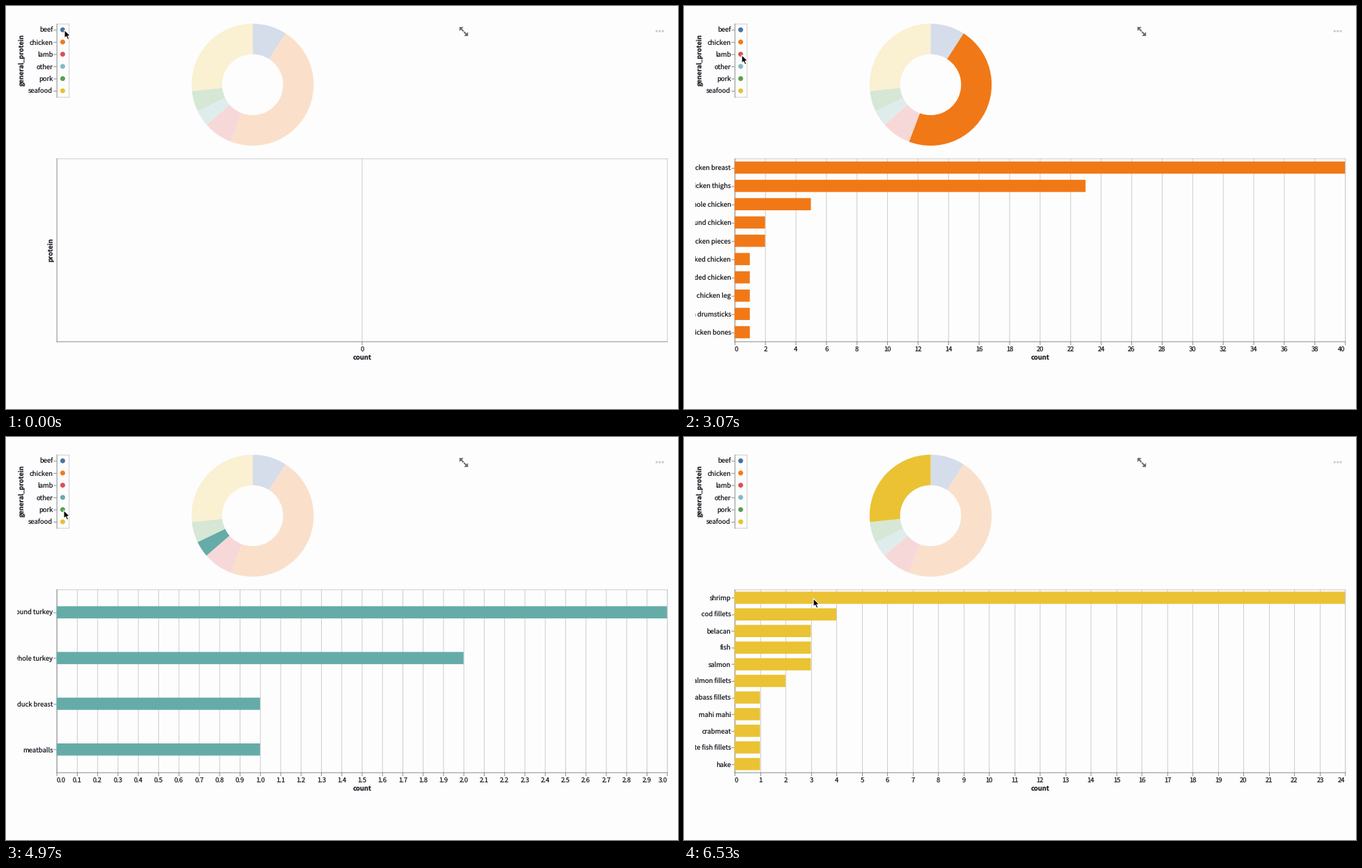
These frames come from a looping animation (966 px wide and 580 px high, 6.56 s). A matplotlib script:

```python
import matplotlib.pyplot as plt
from matplotlib.animation import FuncAnimation
from matplotlib.patches import Circle, Polygon, Rectangle, Wedge

W, H, DPI = 966, 580, 100
LOOP, STEP = 6560, 40
PX = 72 / DPI
BG, INK, AXIS, GRID = "#fdfdfd", "#1f2028", "#888888", "#cccccc"

# layout is in chart units, scaled down by S
S = 0.975
LEFT, LEGEND_TOP, TOP = 72.7, 25.5, 219.4
CHART_W, CHART_H, ROW = 900, 270, 18
RIGHT, BOTTOM = LEFT + CHART_W * S, TOP + CHART_H * S

# name: strong colour, faded colour, legend dot, tick step, rows
GROUPS = {
    "beef": ("#436b9f", "#d5ddea", "#4674a6", 0.2, [
        ("steak", 6), ("ground chuck", 5), ("chuck roast", 3),
        ("beef short ribs", 1)]),
    "chicken": ("#f17816", "#fae0ca", "#f07c1a", 2, [
        ("chicken breast", 40), ("chicken thighs", 23), ("whole chicken", 5),
        ("ground chicken", 2), ("chicken pieces", 2), ("smoked chicken", 1),
        ("shredded chicken", 1), ("chicken leg", 1),
        ("chicken drumsticks", 1), ("chicken bones", 1)]),
    "lamb": ("#df4c4b", "#f7d8d8", "#da5152", 0.2, [
        ("lamb", 5), ("lamb stew meat", 3), ("ground lamb", 2),
        ("lamb shoulder", 2), ("leg of lamb", 1)]),
    "other": ("#65aca8", "#deedec", "#82bbc1", 0.1, [
        ("ground turkey", 3), ("whole turkey", 2), ("duck breast", 1),
        ("meatballs", 1)]),
    "pork": ("#57a04f", "#d6e7d5", "#58a152", 0.1, [
        ("pork chops", 3), ("ground pork", 2), ("pork shoulder", 2),
        ("bacon", 1), ("pork belly", 1)]),
    "seafood": ("#eac234", "#faf0d2", "#e9c132", 1, [
        ("shrimp", 24), ("cod fillets", 4), ("belacan", 3), ("fish", 3),
        ("salmon", 3), ("salmon fillets", 2), ("seabass fillets", 1),
        ("mahi mahi", 1), ("crabmeat", 1), ("white fish fillets", 1),
        ("hake", 1)]),
}

# click times in ms
CLICKS = [(0, None), (630, "beef"), (2130, "chicken"), (3100, "lamb"),
          (4170, "other"), (5000, "pork"), (5700, "seafood")]

# pointer moves: start, end, destination
HOME = (84, 34.5)
MOVES = [(970, 1600, (83.2, 52.5)), (2530, 2730, (83, 70.5)),
         (3270, 3600, (83, 89)), (4370, 4700, (83, 105.5)),
         (5030, 5300, (82.5, 122.5)), (5780, 6330, (186, 236)),
         (6370, 6530, (186, 232.5))]
ARROW = [(0, 0), (0, 11.8), (2.7, 9.4), (4.6, 13.8), (6.8, 12.9),
         (4.9, 8.6), (8.6, 8.4)]

plt.rcParams["font.family"] = ["Noto Sans CJK JP", "DejaVu Sans"]
plt.rcParams["text.hinting"] = "none"
fig = plt.figure(figsize=(W / DPI, H / DPI), dpi=DPI, facecolor=BG)
ax = fig.add_axes([0, 0, 1, 1])
ax.set(xlim=(0, W), ylim=(H, 0))
ax.axis("off")


def label(x, y, s, ha="center", bold=False, rotation=0):
    return ax.text(x, y, s, ha=ha, va="baseline", color=INK,
                   fontsize=9.4 * PX, rotation=rotation,
                   rotation_mode="anchor",
                   fontweight="bold" if bold else "normal")


def rule(draw, at, start, end, color, z):
    # lines sit half a chart unit past their position
    lines = draw([v + S / 2 for v in at], start, end, color=color,
                 lw=S * PX, zorder=z)
    lines.set_snap(False)
    return lines


def vline(xs, y0, y1, color, z=1):
    return rule(ax.vlines, xs, y0, y1, color, z)


def hline(ys, x0, x1, color, z=1):
    return rule(ax.hlines, ys, x0, x1, color, z)


def on_grid(origin, units):
    return origin + S * int(units + 0.5)


def x_ticks(xs):
    return [vline(xs, TOP, BOTTOM, GRID),
            vline(xs, BOTTOM, BOTTOM + 5.4, AXIS, 2)]


def bar_chart(color, _faded, _dot, step, rows):
    peak = rows[0][1]
    count = round(peak / step)
    xs = [on_grid(LEFT, CHART_W * i / count) for i in range(count + 1)]
    parts = x_ticks(xs)
    for i, x in enumerate(xs):
        text = f"{i * step:.1f}" if step < 1 else str(i * step)
        ha = "left" if i == 0 else "right" if i == count else "center"
        parts.append(label(x + S / 2, 497.3, text, ha))
    mids = [CHART_H * (i + 0.5) / len(rows) for i in range(len(rows))]
    parts.append(hline([on_grid(TOP, m) for m in mids], LEFT - 4.4, LEFT,
                       AXIS, 2))
    for mid, (name, value) in zip(mids, rows):
        y = TOP + S * mid
        bar = Rectangle((LEFT, y - ROW * S / 2), CHART_W * S * value / peak,
                        ROW * S, fc=color, lw=0, zorder=3, snap=False)
        parts.append(ax.add_patch(bar))
        parts.append(label(67.5, y + 3.7, name, "right"))
    return parts


def empty_chart():
    x = LEFT + S * CHART_W / 2
    return x_ticks([x]) + [
        label(x + S / 2, 497.3, "0"),
        label(67.3, 351, "protein", bold=True, rotation=90)]


def draw_legend():
    bottom = LEGEND_TOP + ROW * len(GROUPS) * S
    hline([LEGEND_TOP, bottom], LEFT, LEFT + ROW * S + S, GRID)
    vline([LEFT + ROW * S], LEGEND_TOP, bottom + S, GRID)
    vline([LEFT], LEGEND_TOP, bottom + S, AXIS, 2)
    dots = {}
    for i, (name, (_, _, color, *_)) in enumerate(GROUPS.items()):
        y = LEGEND_TOP + ROW * S * (i + 0.5)
        label(67.5, y + 3.7, name, "right")
        hline([y], LEFT - 4.4, LEFT, AXIS, 2)
        dots[name] = ax.add_patch(
            Circle((LEFT + ROW * S / 2, y), 3.5, fc=color, lw=0, zorder=3))
    label(26, 78, "general_protein", bold=True, rotation=90)
    return dots


def draw_donut():
    sums = {k: sum(v for _, v in g[4]) for k, g in GROUPS.items()}
    total, angle, wedges = sum(sums.values()), -90, {}
    radius = 90 * S
    for name, n in sums.items():
        end = angle + 360 * n / total
        wedges[name] = ax.add_patch(
            Wedge((354.5, LEGEND_TOP + radius), radius, angle, end,
                  width=radius / 2, lw=0))
        angle = end
    return wedges


def draw_icons():
    for s in (-1, 1):
        cx, cy = 658, 36.7
        head = [(6.2, 6.5), (6.2, 0.6), (0.3, 6.5)]
        ax.add_patch(Polygon([(cx + s * x, cy + s * y) for x, y in head],
                             fc="#6b6b6b", lw=0))
        ax.plot([cx + s * 1, cx + s * 4.5], [cy + s * 1.1, cy + s * 4.7],
                color="#6b6b6b", lw=2 * PX)
    for x in (935.3, 939.7, 944.1):
        ax.add_patch(Circle((x, 36.2), 1.6, fc="#c9c9c9", lw=0))


def draw_frame():
    hline([TOP], LEFT, RIGHT + S, GRID)
    vline([RIGHT], TOP, BOTTOM, GRID)
    vline([LEFT], TOP, BOTTOM + S, AXIS, 2)
    hline([BOTTOM], LEFT, RIGHT + S, AXIS, 2)
    label(512, 510.3, "count", bold=True)
    # long row names are cut off at the left margin
    ax.add_patch(Rectangle((0, TOP), 15.6, BOTTOM - TOP, fc=BG, lw=0,
                           zorder=5))


dots = draw_legend()
wedges = draw_donut()
draw_icons()
draw_frame()
charts = {name: bar_chart(*g) for name, g in GROUPS.items()}
charts[None] = empty_chart()
pointer = ax.add_patch(Polygon(ARROW, fc="black", ec="white", lw=1.1 * PX,
                               joinstyle="round", zorder=6))


def pointer_at(t):
    x, y = HOME
    for start, end, (tx, ty) in MOVES:
        p = min(max((t - start) / (end - start), 0), 1)
        p = p * p * (3 - 2 * p)
        x, y = x + (tx - x) * p, y + (ty - y) * p
    return x, y


def update(i):
    t = (i + 0.5) * STEP
    chosen = [name for start, name in CLICKS if t >= start][-1]
    for name, parts in charts.items():
        for part in parts:
            part.set_visible(name == chosen)
    for name, wedge in wedges.items():
        wedge.set_facecolor(GROUPS[name][0 if name == chosen else 1])
    dots["other"].set_facecolor(GROUPS["other"][0 if chosen == "other" else 2])
    x, y = pointer_at(t)
    pointer.set_xy([(x + dx, y + dy) for dx, dy in ARROW])
    return []


anim = FuncAnimation(fig, update, frames=LOOP // STEP, interval=STEP,
                     repeat=True, repeat_delay=0)
plt.show()
```
